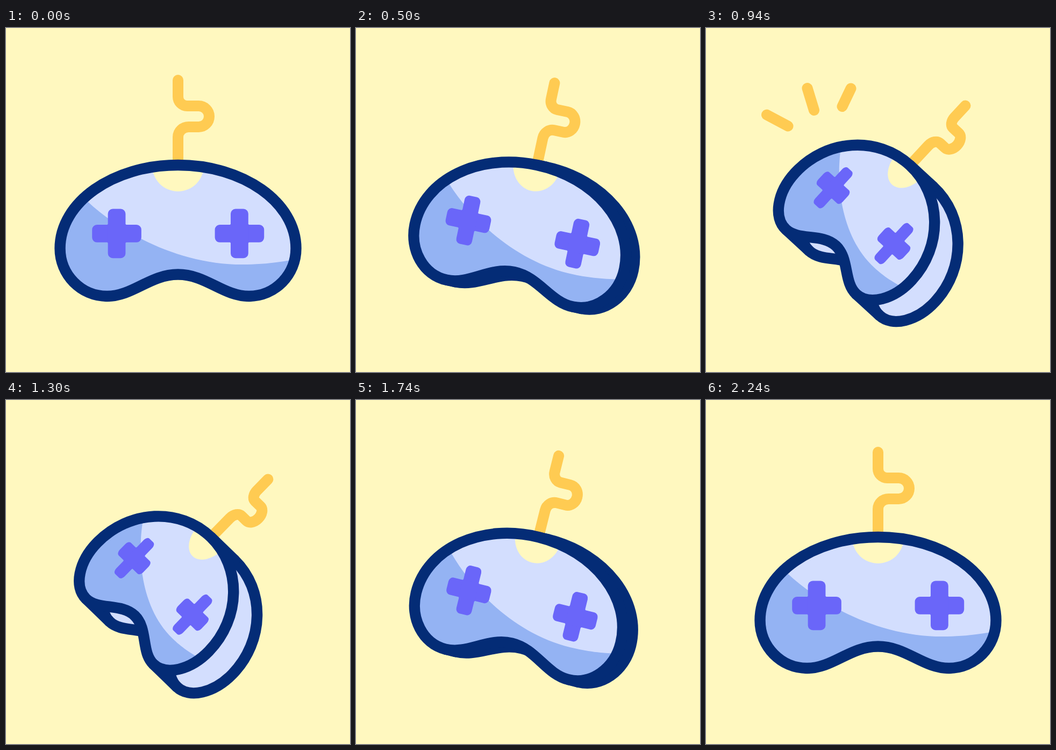
Write an HTML page that moves like this. It is 640 px wide and 640 px high and loops after 2.4 s.

```html
<!DOCTYPE html>
<html lang="en">
<head>
<meta charset="utf-8">
<title>Game controller</title>
<style>
  html, body { margin: 0; width: 100%; height: 100%; overflow: hidden; background: #fff8bf; }
  svg { display: block; width: 100vw; height: 100vh; }
  .line { fill: none; stroke-width: 20; stroke-linecap: round; stroke-linejoin: round; }
  .yellow { stroke: #ffcb52; }
  .navy { stroke: #042c76; stroke-width: 20.4; }
</style>
</head>
<body>
<svg viewBox="0 0 640 640">
  <defs>
    <clipPath id="clip"><path id="clipShape"/></clipPath>
    <g id="cross" fill="#6a66f9">
      <rect x="-45.8" y="-16.4" width="91.6" height="32.8" rx="9"/>
      <rect x="-16.4" y="-45.8" width="32.8" height="91.6" rx="9"/>
      <rect x="-17.4" y="-17.4" width="34.8" height="34.8" rx="1"/>
    </g>
  </defs>
  <rect width="640" height="640" fill="#fff8bf"/>
  <path id="sparks" class="line yellow"/>
  <path id="cord" class="line yellow"/>
  <g id="back">
    <path id="backBody" class="line navy" style="fill:#d3defe"/>
    <path id="edges" class="line navy"/>
  </g>
  <g id="face">
    <g clip-path="url(#clip)">
      <rect x="80" y="240" width="480" height="280" fill="#d3defe"/>
      <path fill="#94b3f3" d="M80 300H131L152 323C213 380 320 440 440 440C475 440 505 437 550 428V520H80Z"/>
      <circle cx="320" cy="256" r="48" fill="#fff8bf"/>
    </g>
    <use href="#cross" x="206" y="382.4"/>
    <use href="#cross" x="434.4" y="382.4"/>
  </g>
  <path id="outline" class="line navy"/>
</svg>
<script>
const el = id => document.getElementById(id);
const set = (id, name, value) => el(id).setAttribute(name, value);

const LOOP = 2400, TURN = 1120, END = 2240, REST = 45;
const PIVOT = { x: 320, y: 256 };

// Controller shell; drop lowers the notch between the grips
const shell = (drop = 0) => {
  const y = (458.5 + drop).toFixed(2);
  return 'M320 255C441.2 255 539.5 324.4 539.5 410C539.5 459 500.5 499 452 499' +
    `C404 499 372 ${y} 320 ${y}C268 ${y} 236 499 188 499` +
    'C139.5 499 100.5 459 100.5 410C100.5 324.4 198.8 255 320 255Z';
};
const BODY = shell();
const CORD = 'M320 97L320 128C320 137.4 327.6 145 337 145L358.5 145' +
  'C369.3 145 378 153.7 378 164.5C378 175.3 369.3 184 358.5 184L340 184' +
  'C329 184 320 192 320 203L320 252';

// Swing keys: time, angle, slope per ms
const KEYS = [
  [0, 0, 0], [320, 3.25, 0.025], [550, 17.2, 0.125], [640, 29.3, 0.152],
  [740, 45, 0.14], [800, 51, 0], [870, 45.6, -0.075], [940, 42.6, 0], [1070, REST, 0]
];

// Sparks from the inner to the outer end
const SPARKS = [[152.5, 182.5, 113, 161.5], [201, 153, 188.5, 112], [253.5, 146, 269.5, 112.5]];

const clamp = v => Math.min(1, Math.max(0, v));
const smooth = v => v * v * (3 - 2 * v);

function hermite([t0, a, da], [t1, b, db], t) {
  const h = t1 - t0, u = (t - t0) / h, v = 1 - u;
  return a * v * v * (1 + 2 * u) + b * u * u * (3 - 2 * u) + h * u * v * (da * v - db * u);
}

// Cubic bezier ease (c, 0, 1 - c, 1)
function ease(x, c) {
  let lo = 0, hi = 1;
  for (let i = 0; i < 24; i++) {
    const m = (lo + hi) / 2, n = 1 - m;
    if (3 * c * m * n * n + 3 * (1 - c) * m * m * n + m * m * m < x) lo = m; else hi = m;
  }
  return smooth(lo);
}

function swing(t) {
  if (t >= END) return 0;
  if (t >= TURN) return REST * ease((END - t) / (END - TURN), 0.75);
  const i = KEYS.findIndex(k => k[0] > t);
  return i < 0 ? REST : hermite(KEYS[i - 1], KEYS[i], t);
}

function pose(deg, depth = 0, sy = 1) {
  const r = deg * Math.PI / 180, c = Math.cos(r), s = Math.sin(r);
  const sx = 1 - 0.0077 * deg;
  const ox = PIVOT.x + 1.373 * deg + depth * c, oy = PIVOT.y + depth * s;
  const m = [sx * c, sx * s, -sy * s, sy * c];
  return [...m, ox - m[0] * PIVOT.x - m[2] * PIVOT.y, oy - m[1] * PIVOT.x - m[3] * PIVOT.y];
}

const apply = ([a, b, c, d, e, f], x, y) =>
  (a * x + c * y + e).toFixed(2) + ' ' + (b * x + d * y + f).toFixed(2);

// Moves path points so the line weight stays constant
const bend = (path, m) =>
  path.replace(/([\d.]+) ([\d.]+)/g, (_, x, y) => apply(m, +x, +y) + ' ');

function sparkPath(t) {
  const head = smooth(clamp((t - 770) / 140)), tail = smooth(clamp((t - 945) / 115));
  if (head <= 0 || tail >= 1) return '';
  return SPARKS.map(([x, y, X, Y]) => {
    const at = k => (x + (X - x) * k) + ' ' + (y + (Y - y) * k);
    return 'M' + at(tail) + 'L' + at(head);
  }).join('');
}

function draw(t) {
  const deg = swing(t);
  const front = pose(deg), back = pose(deg, 1.385 * deg);
  const drop = 6 * Math.max(0, Math.sin(Math.PI * deg / REST));
  set('face', 'transform', 'matrix(' + front.join(' ') + ')');
  set('outline', 'd', bend(BODY, front));
  set('cord', 'd', bend(CORD, pose(1.007 * deg, 0, 1 - 0.001 * deg)));
  set('back', 'visibility', deg > 0.05 ? 'visible' : 'hidden');
  set('backBody', 'd', bend(shell(drop), back));
  set('edges', 'd', [[320, 255], [188, 499], [452, 499]].map(([x, y]) =>
    'M' + apply(front, x, y) + 'L' + apply(back, x, y)).join(''));
  set('sparks', 'd', sparkPath(t));
}

set('clipShape', 'd', BODY);
const start = performance.now();
function tick() {
  draw((performance.now() - start) % LOOP);
  requestAnimationFrame(tick);
}
tick();
</script>
</body>
</html>
```
